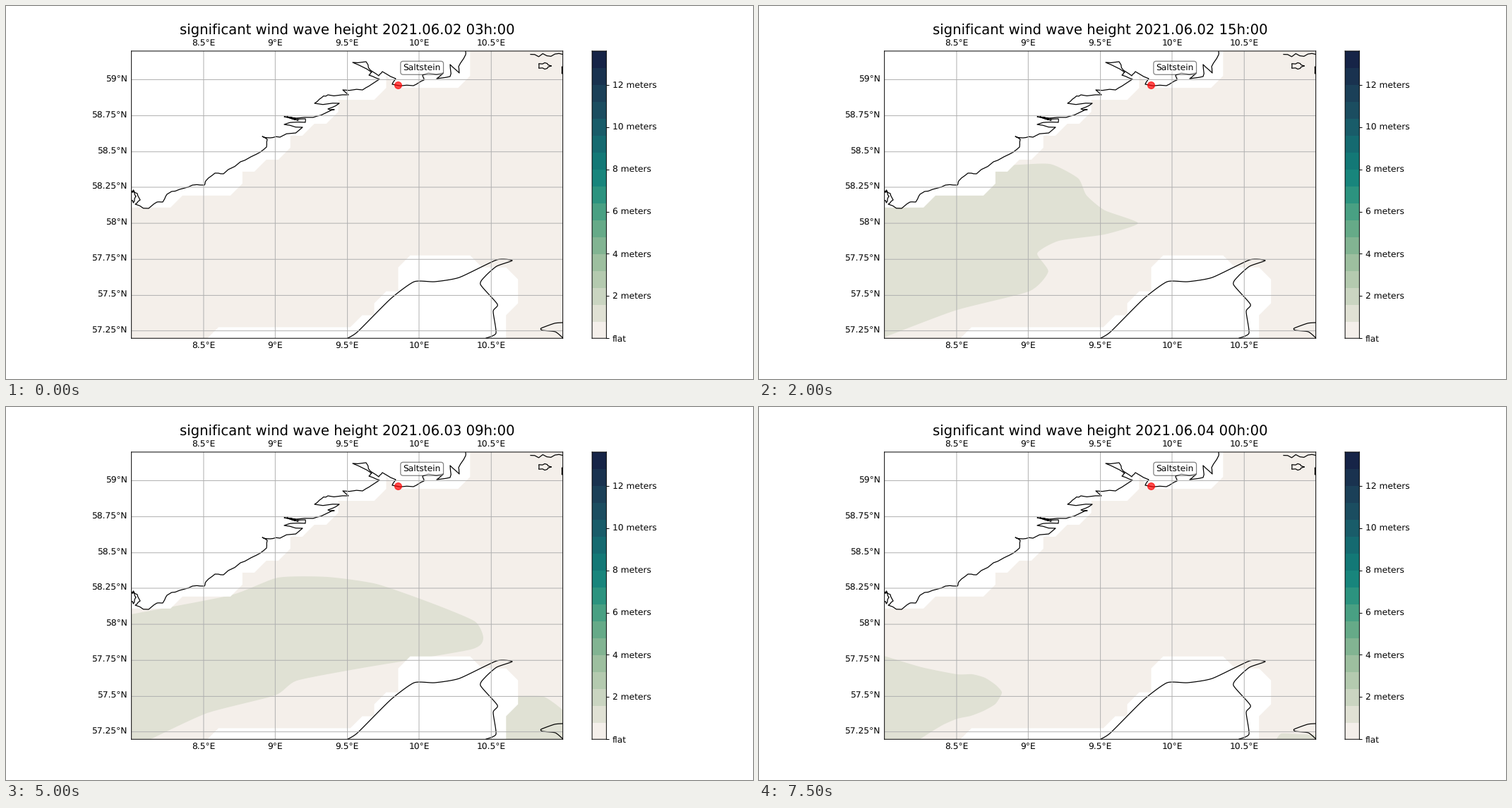
These frames come from a looping animation (1058 by 529 pixels, 8 s). A matplotlib script:

```python
import numpy as np
import matplotlib.pyplot as plt
from matplotlib.animation import FuncAnimation
from matplotlib.colors import LinearSegmentedColormap
from matplotlib.patches import Polygon, Rectangle

W, H = 1058, 529
DPI = W / 12
S = W / 1200            # layout is planned on a 1200 x 600 sheet
STEPS, STEP_MS = 16, 500

plt.rcParams.update({"font.family": "DejaVu Sans", "font.size": 10,
                     "path.snap": False, "text.hinting": "none"})


def pix(v):
    """Centre of the sheet pixel nearest to v, in stage pixels."""
    return (np.floor(v + 0.5) + 0.5) * S


def pts(*v):
    return np.array(v, float).reshape(-1, 2)


def smooth(p, n=8, pull=0.3):
    """Cardinal spline through the points p."""
    ext = np.vstack([p[:1], p, p[-1:]])
    m = pull * (ext[2:] - ext[:-2])
    t = np.linspace(0, 1, n, endpoint=False)[:, None]
    a, b, ma, mb = p[:-1, None], p[1:, None], m[:-1, None], m[1:, None]
    curve = (a * (2 * t**3 - 3 * t**2 + 1) + b * (3 * t**2 - 2 * t**3)
             + ma * (t**3 - 2 * t**2 + t) + mb * (t**3 - t**2))
    return np.vstack([curve.reshape(-1, 2), p[-1:]])


def rough(p, n=3, amount=0.04, seed=4):
    """Polyline through p with small random bends between the points."""
    rng = np.random.default_rng(seed)
    out = []
    for a, b in zip(p[:-1], p[1:]):
        size = amount * np.hypot(*(b - a))
        bends = a + (b - a) * np.arange(1, n)[:, None] / n
        out += [a, *(bends + rng.normal(0, size, bends.shape))]
    return np.array(out + [p[-1]])


def islet(x, y, rx, ry):
    t = np.linspace(0, 2 * np.pi, 14)
    r = 1 + 0.25 * np.cos(5 * t)
    return np.column_stack([x + rx * r * np.cos(t), y + ry * r * np.sin(t)])


def skerries(x0, x1, y, n=9, seed=2):
    wave = np.random.default_rng(seed).uniform(-3, 3, n)
    return np.column_stack([np.linspace(x0, x1, n), y + wave])


def cells(*v):
    """Corners on the 1/12 degree model grid, in stage pixels."""
    return pts(*v) * 231 / 12 * S + (182.1, 65.2)


# ---- coastlines and cells without wave data ----
NORTH_COAST = pts(
    177, 262, 186, 266, 190, 275, 183, 281, 202, 287, 214, 278, 222, 278,
    228, 267, 246, 260, 264, 254, 281, 254, 283, 248, 296, 237, 308, 238,
    332, 221, 355, 210, 369, 200, 370, 189, 363, 185, 374, 187, 388, 186,
    420, 172, 394, 168, 424, 165, 424, 160, 394, 157, 414, 162, 398, 157,
    435, 158, 452, 152, 465, 147, 456, 146, 472, 138, 437, 138, 447, 130,
    456, 126, 485, 126, 477, 119, 505, 119, 518, 111, 529, 104, 514, 98,
    518, 94, 491, 80, 510, 79, 516, 91, 528, 99, 533, 93, 552, 103,
    547, 111, 577, 113, 592, 105, 590, 98, 619, 95, 610, 103, 629, 100,
    629, 83, 642, 95, 641, 86, 651, 69, 651, 63)
SOUTH_COAST = pts(
    484, 471, 498, 462, 545, 415, 578, 391, 607, 391, 642, 385, 695, 360,
    717, 361, 695, 369, 679, 383, 672, 395, 696, 423, 690, 433, 694, 464,
    680, 471)
ISLAND = pts(789, 449, 777, 450, 758, 457, 760, 460, 778, 462, 789, 471)

NORTH_CELLS = cells(
    -1, 13, 3, 13, 4, 12, 8, 12, 9, 11, 9, 10, 10, 10, 11, 9, 12, 9, 13, 8,
    13, 7, 14, 7, 15, 6, 16, 6, 17, 5, 17, 4, 20, 4, 21, 3, 21, 2, 22, 3,
    27, 3, 28, 2, 28, -1, -1, -1)
SOUTH_CELLS = cells(
    6, 24, 7, 23, 18, 23, 19, 22, 20, 22, 20, 21, 21, 20, 22, 20, 22, 18,
    23, 17, 28, 17, 29, 18, 31, 18, 32, 19, 32, 21, 31, 22, 31, 24)

# ---- edge of the 0.8 m areas: key points by time step ----
WEST = {
    0: np.tile((177.0, 454.0), (14, 1)),
    3: pts(177, 190, 437, 167, 490, 159, 523, 184, 527, 217, 558, 245, 625, 268,
           558, 287, 466, 297, 432, 320, 472, 354, 440, 388, 300, 421, 177, 471),
    6: pts(177, 324, 215, 342, 260, 355, 310, 365, 337, 371, 352, 379, 361, 388,
           352, 398, 342, 405, 318, 412, 285, 422, 268, 438, 235, 453, 177, 468),
    8: pts(177, 300, 250, 295, 287, 294, 302, 297, 335, 319, 352, 337, 352, 354,
           386, 388, 386, 405, 378, 422, 352, 439, 300, 441, 235, 446, 177, 455),
    10: pts(177, 294, 318, 267, 385, 242, 455, 241, 525, 251, 605, 279, 664, 304,
            676, 328, 658, 344, 505, 370, 412, 388, 381, 409, 285, 434, 205, 471),
    13: pts(177, 299, 240, 291, 318, 267, 370, 250, 440, 262, 490, 280, 501, 310,
            495, 336, 455, 370, 434, 405, 376, 434, 267, 430, 235, 456, 220, 471),
    15: pts(177, 353, 230, 369, 280, 379, 302, 379, 320, 384, 335, 394, 344, 405,
            335, 421, 318, 431, 300, 438, 281, 442, 262, 450, 245, 460, 228, 471),
}
EAST = {
    6: pts(706, 480, 740, 480, 765, 480, 789, 480),
    8: pts(706, 414, 740, 414, 762, 417, 789, 428),
    10: pts(706, 410, 758, 410, 775, 419, 789, 430),
    13: pts(722, 471, 740, 459, 765, 460, 789, 462),
    15: pts(733, 471, 740, 463, 765, 464, 789, 465),
}


def edge(keys, i):
    """Smooth edge at step i, blended between the nearest keys."""
    a = max((k for k in keys if k <= i), default=min(keys))
    b = min(k for k in keys if k >= max(i, a))
    u = (i - a) / (b - a) if b > a else 0
    return smooth((1 - u) * keys[a] + u * keys[b])


# ---- colours ----
TEMPO = ["#fef5f4", "#dee0d2", "#bdceb5", "#99bd9c", "#6ead8a", "#419d81",
         "#19897d", "#127475", "#195e6a", "#1c485d", "#193350", "#141d43"]
BANDS = 17
cmap = LinearSegmentedColormap.from_list("tempo", TEMPO)
shades = [cmap((k + 0.5) / BANDS) for k in range(BANDS)]

fig = plt.figure(figsize=(W / DPI, H / DPI), dpi=DPI, facecolor="white")
TOP, BOTTOM = pix(72), pix(534)


def add_axes(x0, x1):
    return fig.add_axes([x0 / W, 1 - BOTTOM / H, (x1 - x0) / W, (BOTTOM - TOP) / H])


# ---- map, in stage pixels ----
LEFT, RIGHT = pix(201), pix(894)
ax = add_axes(LEFT, RIGHT)
ax.set(xlim=(LEFT, RIGHT), ylim=(BOTTOM, TOP), xticks=[], yticks=[],
       facecolor=shades[0])


def area(p, color, z):
    return ax.add_patch(Polygon(p, closed=True, fc=color, ec="none", lw=0, zorder=z))


west = area(WEST[0], shades[1], 0.5)
east = area(EAST[6], shades[1], 0.5)
for land in (NORTH_CELLS, SOUTH_CELLS):
    area(land, "white", 1)
for line in (rough(NORTH_COAST), smooth(SOUTH_COAST), smooth(ISLAND),
             islet(180, 270, 3, 8), islet(762, 85, 8, 4), islet(791, 91, 4, 6),
             skerries(743, 789, 70)):
    ax.plot(*line.T, color="black", lw=1, zorder=1.5)

grid = dict(color="#b0b0b0", lw=0.8, zorder=2)
for lon in np.arange(8.5, 11, 0.5):
    x = 201 + (lon - 8) * 231
    ax.axvline(pix(x), **grid)
    for y in (56.8, 485.9):
        ax.text(x * S + 0.4, y, f"{lon:g}°E", ha="center", va="baseline")
for lat in np.arange(57.25, 59.1, 0.25):
    y = 72 + (59.2 - lat) * 231
    ax.axhline(pix(y), **grid)
    ax.text(LEFT - 6, y * S, f"{lat:g}°N", ha="right", va="center")

ax.plot([555], [111.5], "o", color="red", ms=8, alpha=0.7, zorder=3)
ax.text(589.2, 87.8, "Saltstein", ha="center", va="center", zorder=4,
        bbox=dict(boxstyle="round", fc="white", ec="black", alpha=0.5))
title = ax.text((LEFT + RIGHT) / 2, 39.8, "", ha="center", va="baseline", fontsize=16)

# ---- colour bar ----
bar = add_axes(pix(940.5), pix(963.6))
bar.set(xlim=(0, 1), ylim=(0, 0.8 * BANDS), xticks=[])
for k, shade in enumerate(shades):
    bar.add_patch(Rectangle((0, 0.8 * k), 1, 0.8, fc=shade, ec="none", lw=0,
                            antialiased=False))
bar.yaxis.tick_right()
ticks = range(0, 14, 2)
bar.set_yticks(ticks, [f"{m} meters" if m else "flat" for m in ticks],
               va="center_baseline")


def draw(i):
    hours = 3 + 3 * i
    title.set_text("significant wind wave height "
                   f"2021.06.{2 + hours // 24:02d} {hours % 24:02d}h:00")
    west.set_xy(np.vstack([edge(WEST, i), (LEFT, BOTTOM if i else 454)]))
    east.set_xy(np.vstack([edge(EAST, i), (RIGHT, 480), (706, 480)]))
    return west, east, title


anim = FuncAnimation(fig, draw, frames=STEPS, init_func=lambda: draw(0),
                     interval=STEP_MS, repeat=True, repeat_delay=0, blit=False)
plt.show()
```
